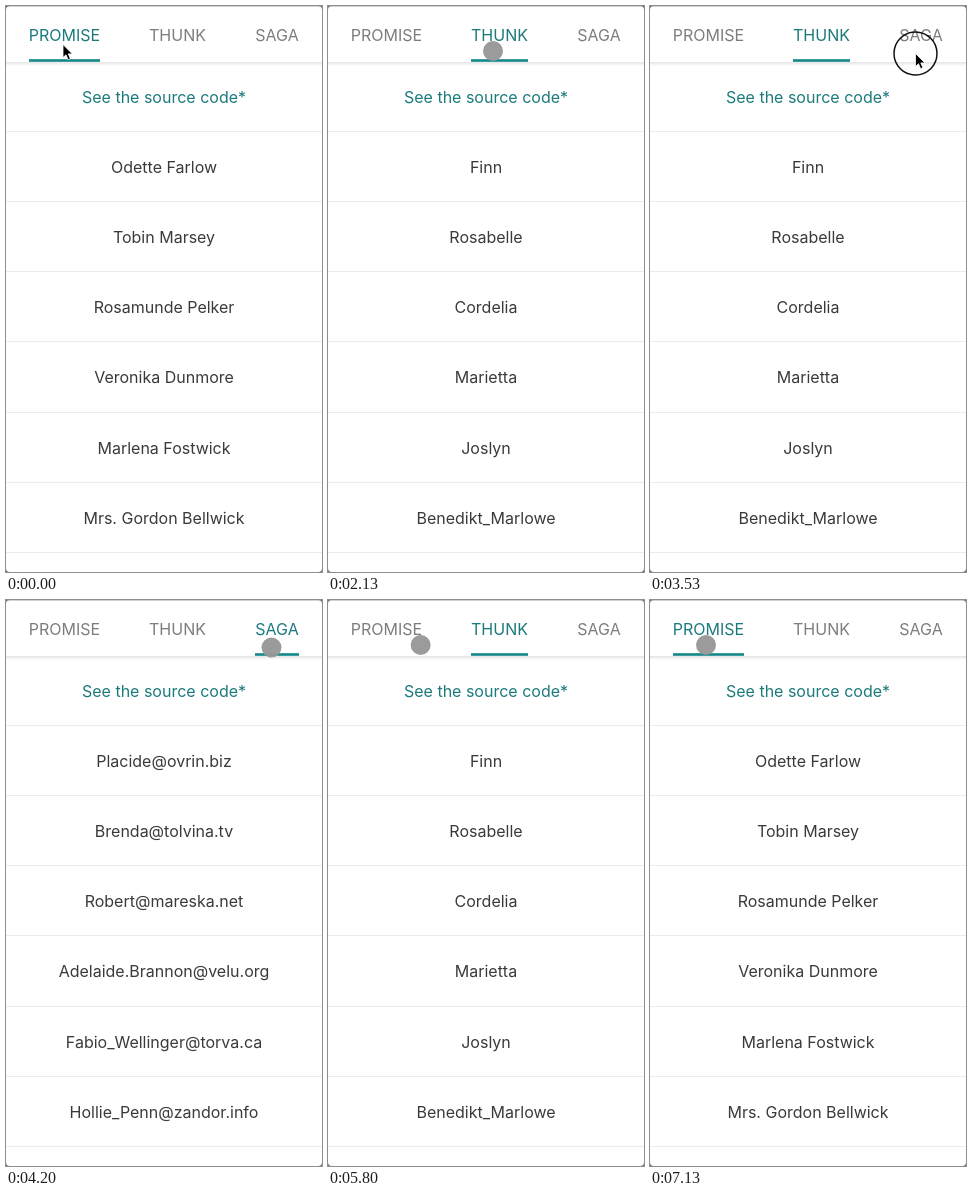
An HTML page for the animation above (7.19 s loop, 316 by 566 pixels).

```html
<!DOCTYPE html>
<html lang="en">
<head>
<meta charset="utf-8">
<title>Tabs</title>
<style>
  html, body { margin: 0; width: 100%; height: 100%; overflow: hidden; background: #fff; }
  svg { display: block; width: 100%; height: 100%; }
  text { font: 16px Inter, Roboto, sans-serif; text-anchor: middle; }
  .tab { fill: #7d7d7d; }
  .tab.on, .link { fill: #1c7a7c; }
  .item { fill: #3a3a3a; }
</style>
</head>
<body>
<svg viewBox="0 0 316 566">
  <defs>
    <linearGradient id="shade" x2="0" y2="1">
      <stop stop-color="#e4e4e4"/>
      <stop offset="1" stop-color="#fff"/>
    </linearGradient>
  </defs>
  <rect width="316" height="566" fill="#fff"/>
  <path d="M0 .5H316" stroke="#d2d2d2"/>
  <path d="M0 0H4Q0 0 0 4ZM316 0H312Q316 0 316 4ZM0 566H4Q0 566 0 562ZM316 566H312Q316 566 316 562Z" fill="#777"/>
  <rect y="56" width="316" height="4" fill="url(#shade)"/>
  <g id="tabs"></g>
  <rect id="bar" y="53.2" height="2.6" fill="#128788"/>
  <g id="rows"></g>
  <g id="pointer">
    <circle id="dot" r="10" fill="#979797" opacity=".96"/>
    <circle id="ring" r="21.5" fill="none" stroke="#111" stroke-width="1.5"/>
    <path id="arrow" d="M0 0V13L3 10.3L5.1 15.2L7.4 14.2L5.3 9.4H9.4Z" fill="#000" stroke="#fff" stroke-width=".8"/>
  </g>
</svg>
<script>
const LOOP = 7190, FPS = 15;
const $ = id => document.getElementById(id);

const tabs = [
  { name: 'PROMISE', x: 23, w: 71, items: ['Odette Farlow', 'Tobin Marsey', 'Rosamunde Pelker',
    'Veronika Dunmore', 'Marlena Fostwick', 'Mrs. Gordon Bellwick'] },
  { name: 'THUNK', x: 143, w: 57, items: ['Finn', 'Rosabelle', 'Cordelia',
    'Marietta', 'Joslyn', 'Benedikt_Marlowe'] },
  { name: 'SAGA', x: 249, w: 44, items: ['Placide@ovrin.biz', 'Brenda@tolvina.tv', 'Robert@mareska.net',
    'Adelaide.Brannon@velu.org', 'Fabio_Wellinger@torva.ca', 'Hollie_Penn@zandor.info'] }
];
// press time, release time, tab opened on release
const clicks = [[1460, 1600, 1], [3460, 3600, 2], [5060, 5130, 1], [6260, 6400, 0]];
// start, end, target x, target y, downward bow
const moves = [
  [530, 1225, 165, 45, 7],
  [2270, 3187, 265.5, 47.5, 2],
  [4470, 5098, 165, 45, 2],
  [5200, 6190, 56, 45, 0]
];

function add(parent, tag, attrs, text = '') {
  const el = document.createElementNS('http://www.w3.org/2000/svg', tag);
  for (const key in attrs) el.setAttribute(key, attrs[key]);
  el.textContent = text;
  return parent.appendChild(el);
}

const labels = tabs.map(t => add($('tabs'), 'text', { x: t.x + t.w / 2, y: 35, class: 'tab' }, t.name));
const rows = [];
for (let i = 0; i < 7; i++) {
  const y = 91 + i * 70.2;
  const line = Math.floor(y + 34.3) + .5;
  rows.push(add($('rows'), 'text', { x: 158, y: Math.floor(y) + 6, class: i ? 'item' : 'link' }));
  add($('rows'), 'path', { d: `M0 ${line}H316`, stroke: '#ebebeb' });
}
rows[0].textContent = 'See the source code*';

function pointerAt(t) {
  let x = 57, y = 38.5;
  for (const [start, end, toX, toY, bow] of moves) {
    if (t < start) break;
    const u = Math.min(1, (t - start) / (end - start));
    const k = u * u * (3 - 2 * u);
    x += (toX - x) * k;
    y += (toY - y) * k + bow * Math.sin(Math.PI * u);
  }
  return [x, y];
}

let shown = -1;
function showTab(index) {
  if (index === shown) return;
  shown = index;
  const { x, w, items } = tabs[index];
  labels.forEach((el, i) => el.classList.toggle('on', i === index));
  $('bar').setAttribute('x', x);
  $('bar').setAttribute('width', w);
  items.forEach((name, i) => rows[i + 1].textContent = name);
}

function show(id, on) {
  $(id).style.display = on ? '' : 'none';
}

function draw(now) {
  // the picture steps 15 times a second
  const t = Math.floor((now % LOOP + 5) * FPS / 1000) * 1000 / FPS + 5;
  let tab = 0, pressed = false;
  for (const [down, up, next] of clicks) {
    if (t >= up) tab = next;
    if (t >= down && t < up) pressed = true;
  }
  showTab(tab);
  const arrow = pressed || t < clicks[0][1];
  show('ring', pressed);
  show('arrow', arrow);
  show('dot', !arrow);
  $('pointer').setAttribute('transform', `translate(${pointerAt(t)})`);
}

const began = performance.now();
function tick() {
  draw(performance.now() - began);
  requestAnimationFrame(tick);
}
tick();
</script>
</body>
</html>
```
